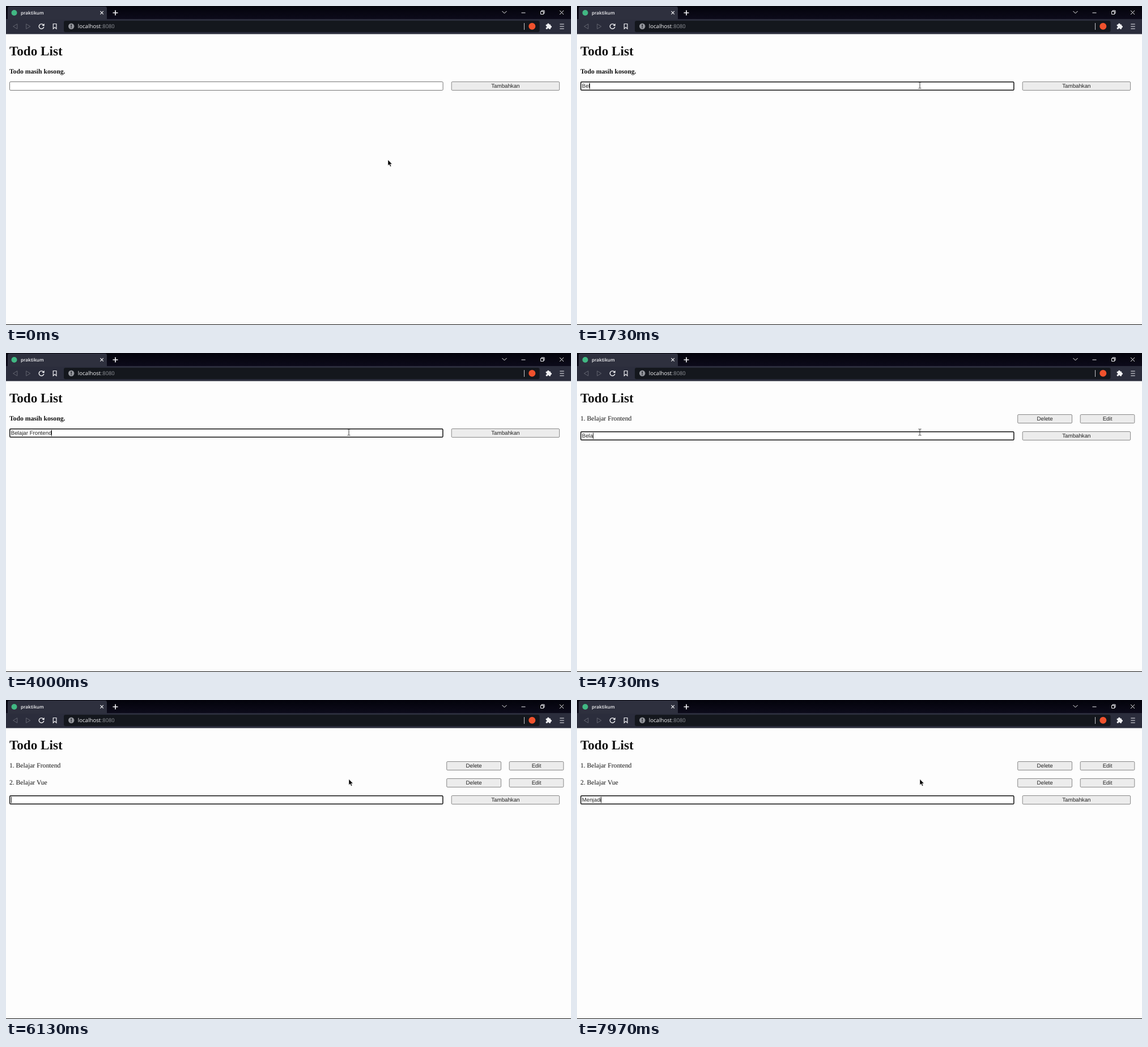
An HTML page for the animation above (8000 ms loop, 997 px wide and 562 px high).

```html
<!DOCTYPE html>
<html lang="id">
<head>
<meta charset="utf-8">
<title>praktikum</title>
<style>
  html, body { margin: 0; width: 100%; height: 100%; overflow: hidden; background: #fdfdfd; }
  svg { display: block; width: 997px; height: 562px; }
  text { white-space: pre; text-rendering: geometricPrecision; }
  .ui { font: 8.1px "Open Sans", sans-serif; fill: #f4f4f6; }
  .url { font-size: 9.7px; }
  .serif { font: 11.68px "Liberation Serif", serif; fill: #111; }
  .sans { font: 9.73px "Liberation Sans", sans-serif; fill: #222; }
  .mid { text-anchor: middle; }
  .line { fill: none; stroke: #f0f0f3; stroke-width: 1.2; }
  .dim { stroke: #62646f; }
  .button { fill: #ececec; stroke: #7b7b7b; stroke-width: .9; }
</style>
</head>
<body>
<svg viewBox="0 0 997 562">
  <defs>
    <linearGradient id="strip" x2="0" y2="1">
      <stop stop-color="#03030b"/><stop offset="1" stop-color="#0d0b1b"/>
    </linearGradient>
  </defs>
  <rect width="997" height="562" fill="#fdfdfd"/>
  <rect y="561" width="997" height="1" fill="#111"/>

  <!-- browser window -->
  <rect width="997" height="24" fill="url(#strip)"/>
  <rect y="23" width="997" height="26.5" fill="#2b2d3c"/>
  <path d="M3 24V4q0-3 3-3H175q3 0 3 3V24Z" fill="#2e303e"/>
  <circle cx="14.5" cy="12" r="5" fill="#41b883"/>
  <text class="ui" x="26" y="14.8" font-weight="600" style="font-weight:600">praktikum</text>
  <path class="line" d="M166.4 9.2l5.4 5.4m0-5.4l-5.4 5.4" stroke-width="1.4"/>
  <path class="line" d="M188.5 12h9M193 7.5v9" style="stroke-width:1.7"/>
  <path class="line" d="M875.5 9l4 4 4-4M909.5 12h7M977 8l7 7m0-7l-7 7" style="stroke-width:1"/>
  <path class="line" d="M943.5 9.5h5v5h-5zM945 9.5v-1.5h5v5h-1.5" style="stroke-width:1"/>

  <path class="line dim" d="M19.8 31.7v8.6l-7.2-4.3zM35.6 31.7v8.6l7.2-4.3z" style="stroke-width:1"/>
  <path class="line" d="M66 33.4A4.3 4.3 0 1 0 66.8 36.6" style="stroke-width:1.4"/>
  <path d="M67.7 30.8v4.3h-4.3z" fill="#f0f0f3"/>
  <path class="line" d="M83.3 31.5h5.6v8.7l-2.8-2.6-2.8 2.6z"/>
  <rect x="102" y="26" width="839.5" height="20" rx="3" fill="#14171d"/>
  <circle cx="115.2" cy="35.8" r="5.2" fill="#93959b"/>
  <path d="M115.2 32.6v3.8m0 1.2v1.5" stroke="#14171d" stroke-width="1.4"/>
  <text class="ui url" x="126.7" y="39.2">localhost</text>
  <text class="ui url" x="167.8" y="39.2" style="fill:#92949a;font-size:9.4px">:8080</text>
  <path d="M914.5 30v12" stroke="#c5c6ca"/>
  <circle cx="928.3" cy="35.8" r="6" fill="#f0522d"/>
  <g fill="#f0f0f3">
    <rect x="952.7" y="32.4" width="8.4" height="8.4" rx="1"/>
    <circle cx="956.8" cy="32.4" r="1.8"/><circle cx="961.2" cy="36.6" r="1.8"/>
  </g>
  <g fill="#2b2d3c"><circle cx="953" cy="36.7" r="1.4"/><circle cx="956.9" cy="40.7" r="1.4"/></g>
  <path class="line" d="M977.3 32h7.4m-7.4 4h7.4m-7.4 4h7.4"/>

  <!-- page -->
  <text class="serif" x="5.9" y="86.6" style="font-size:23.2px;font-weight:bold">Todo List</text>
  <text id="empty" class="serif" x="5.9" y="118.6" style="font-weight:bold">Todo masih kosong.</text>
  <g id="items"></g>
  <g id="form">
    <rect id="field" fill="#fff" rx="1.6"/>
    <text id="value" class="sans" x="8.7" y="11.4"></text>
    <rect id="caret" y="2.5" width="1" height="11" fill="#222"/>
  </g>
  <path id="arrow" d="M0 0V10.2L2.3 8.1 4 12 5.7 11.2 4.1 7.5H7.3Z" fill="#000" stroke="#fff" stroke-width=".5"/>
  <path id="beam" d="M-2.5-5.5h2l.5.5.5-.5h2M0-5V5M-2.5 5.5h2L0 5l.5.5h2" fill="none" stroke="#222" stroke-width=".9"/>
</svg>
<script>
const LOOP = 8000, FOCUS = 830, ARROW_BACK = 6100;
const $ = id => document.getElementById(id);

// Each entry: when its field opens, where it sits, and when each letter is typed.
const entries = [
  { start: 0, y: 133, text: "Belajar Frontend",
    keys: [1330, 1570, 1730, 2170, 2370, 2470, 2570, 2700, 2870, 3070, 3130, 3300, 3370, 3570, 3700, 3800] },
  { start: 4030, y: 138, text: "Belajar Vue",
    keys: [4330, 4430, 4530, 4700, 4800, 4900, 5000, 5230, 5430, 5700, 5770] },
  { start: 6030, y: 168, text: "Menjadi",
    keys: [7070, 7330, 7470, 7670, 7730, 7830, 7970] }
];

function button(x, y, width, label) {
  return `<rect class="button" x="${x + .5}" y="${y + .5}" width="${width - 1}" height="15" rx="1.5"/>
    <text class="sans mid" x="${x + width / 2}" y="${y + 11.4}">${label}</text>`;
}

$("form").insertAdjacentHTML("beforeend", button(785.7, 0, 191.4, "Tambahkan"));
$("items").innerHTML = entries.slice(0, 2).map(({ text }, i) => {
  const y = 108 + 30 * i;
  return `<g><text class="serif" x="5.9" y="${y + 10.6}">${i + 1}. ${text}</text>
    ${button(777.2, y, 96.8, "Delete")}${button(887.7, y, 96.6, "Edit")}</g>`;
}).join("");

const show = (node, on) => node.style.display = on ? "" : "none";

function set(node, attributes) {
  for (const name in attributes) node.setAttribute(name, attributes[name]);
}

function pointerAt(t) {
  const tick = Math.floor(t * .03 + .15);
  const p = Math.min(1, Math.max(0, (tick - 8) / 14));
  const ease = (1 - Math.cos(Math.PI * p)) / 2;
  return { x: 674 - 69 * ease, y: 271 - 131.5 * ease };
}

function render(t) {
  const current = entries.filter(e => t >= e.start).length - 1;
  const { y, text, keys } = entries[current];
  const focused = t >= FOCUS;

  show($("empty"), current === 0);
  [...$("items").children].forEach((item, i) => show(item, i < current));
  set($("form"), { transform: `translate(0 ${y})` });

  const typed = text.slice(0, keys.filter(k => t >= k).length);
  $("value").textContent = typed;
  const width = typed ? $("value").getComputedTextLength() : 0;
  set($("caret"), { x: Math.max(9, Math.floor(8.7 + width)) });
  show($("caret"), focused && !(t >= 6800 && t < 7070));

  const pointer = pointerAt(t);
  const hover = pointer.y < 149 && t < ARROW_BACK;
  const edge = focused ? 1.5 : 1;
  set($("field"), {
    x: 6 + edge / 2, y: edge / 2, width: 765.6 - edge, height: 16 - edge,
    "stroke-width": edge, stroke: focused ? "#101010" : hover ? "#444" : "#767676"
  });

  const place = { transform: `translate(${pointer.x} ${pointer.y})` };
  set($("arrow"), place);
  set($("beam"), place);
  show($("arrow"), !hover);
  show($("beam"), hover);
}

const began = performance.now();
function frame() {
  render((performance.now() - began) % LOOP);
  requestAnimationFrame(frame);
}
frame();
</script>
</body>
</html>
```
